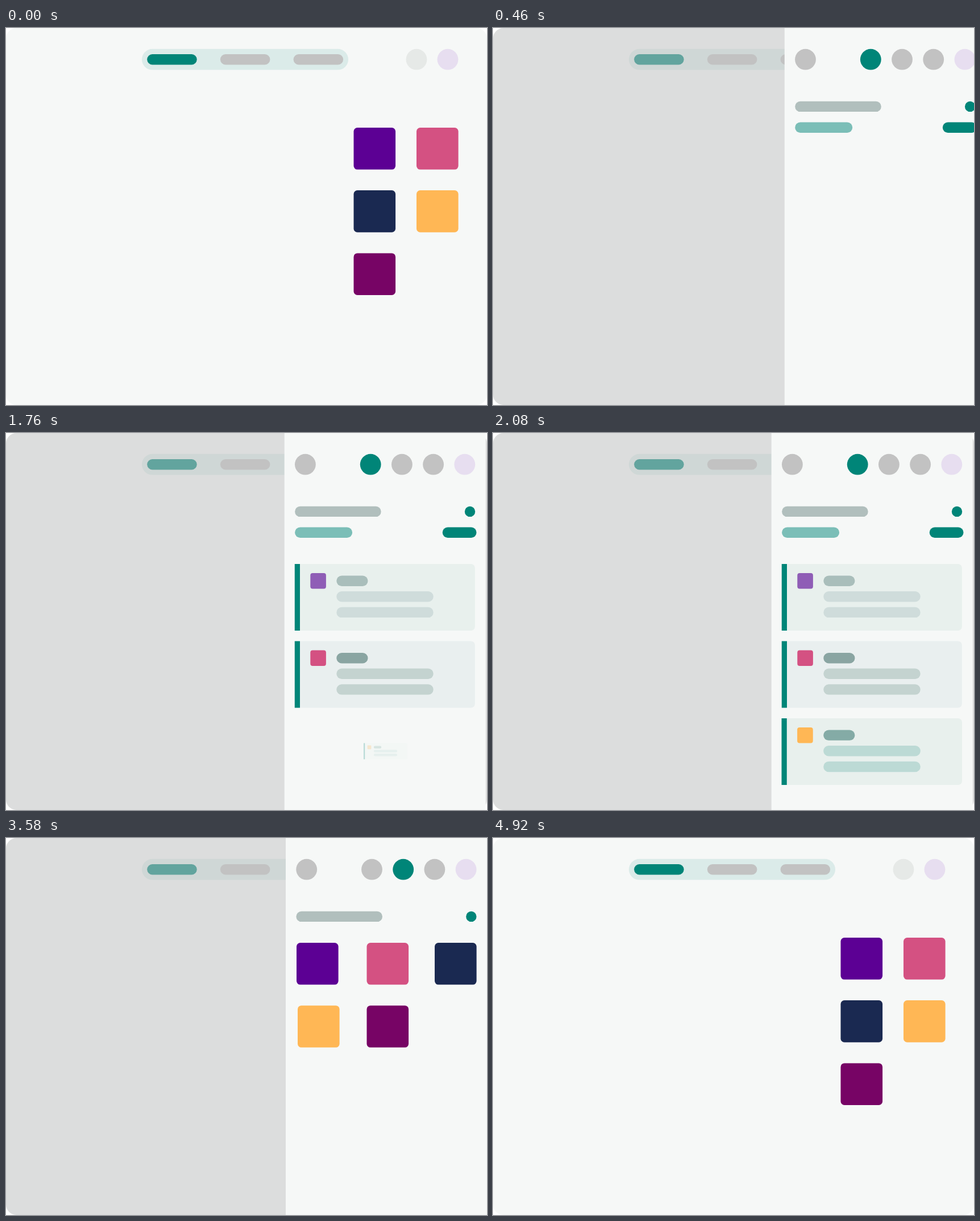
These frames come from a looping animation (846 by 662 pixels, 5.6 s). An HTML page with a canvas:

```html
<!DOCTYPE html>
<html lang="en">
<head>
<meta charset="utf-8">
<title>Side panel</title>
<style>
  html, body { margin: 0; width: 100%; height: 100%; overflow: hidden; background: #fff; }
  canvas { display: block; }
</style>
</head>
<body>
<canvas id="stage" width="846" height="662"></canvas>
<script>
const W = 846, H = 662, LOOP = 5600;
const ctx = document.getElementById('stage').getContext('2d');

const PAGE = '#f6f8f7', TEAL = '#008578', GRAY = '#c2c2c2', LILAC = '#e7def0';
const PURPLE = '#5c0094', PINK = '#d45182', NAVY = '#1a2951', ORANGE = '#ffb755', PLUM = '#770465';
const BAR = 18.4, TILE = 73.6;

const OPEN = { start: 34, time: 520 };
const CLOSE = { start: 4613, time: 300 };
const FADE = 300, SWITCH = 2520;
const TILES_START = 2500, TILE_TIME = 216, CARD_TIME = 350;

const CARDS = [
  { start: 702, y: 288.5, fill: '#e8f0ed', icon: '#8f5db6', title: '#a9bebb', line: '#cfdcdb' },
  { start: 1166, y: 424, fill: '#e9efef', icon: PINK, title: '#8aa5a2', line: '#c4d3d0' },
  { start: 1741.5, y: 559.5, fill: '#e8f0ed', icon: ORANGE, title: '#84aba6', line: '#bcdad5' }
];
const PAGE_TILES = [
  [611.5, 175, PURPLE], [722, 175, PINK], [611.5, 285.1, NAVY],
  [722, 285.1, ORANGE], [611.5, 395.4, PLUM]
];
const PANEL_TILES = [
  [19, 184, PURPLE], [142.5, 184, PINK], [262, 184, NAVY],
  [21, 294.2, ORANGE], [142.5, 294.2, PLUM]
];

const clamp = v => Math.min(1, Math.max(0, v));
const progress = (t, start, time) => clamp((t - start) / time);

// cubic-bezier(.42, 0, .58, 1)
function easeInOut(x) {
  let lo = 0, hi = 1;
  for (let i = 0; i < 24; i++) {
    const s = (lo + hi) / 2;
    if (1.26 * s - 0.78 * s * s + 0.52 * s * s * s < x) lo = s; else hi = s;
  }
  return lo * lo * (3 - 2 * lo);
}

function easeOutBack(x) {
  const k = 1.70158, u = x - 1;
  return 1 + (k + 1) * u * u * u + k * u * u;
}

function box(x, y, w, h, r, color) {
  ctx.fillStyle = color;
  ctx.beginPath();
  ctx.roundRect(x, y, w, h, r);
  ctx.fill();
}

function pill(x, y, w, color) {
  box(x, y, w, BAR, BAR / 2, color);
}

function dot(x, y, r, color) {
  ctx.fillStyle = color;
  ctx.beginPath();
  ctx.arc(x, y, r, 0, Math.PI * 2);
  ctx.fill();
}

function tile(x, y, color, scale = 1) {
  const size = TILE * scale, inset = (TILE - size) / 2;
  if (size > 0) box(x + inset, y + inset, size, size, 6.5 * scale, color);
}

function drawPage() {
  box(0, 0, W, H, BAR, PAGE);
  box(239, 36.8, 363, 36.8, BAR, '#dbebe9');
  [TEAL, GRAY, GRAY].forEach((c, i) => pill(248.2 + i * 128.7, 46, 87.5, c));
  dot(722, 55.2, BAR, '#e6e9e7');
  dot(777, 55.2, BAR, LILAC);
  PAGE_TILES.forEach(([x, y, c]) => tile(x, y, c));
}

function drawCard(card, t) {
  if (t <= card.start) return;
  const e = easeOutBack(progress(t, card.start, CARD_TIME));
  ctx.save();
  ctx.globalAlpha = clamp(e);
  ctx.translate(176.6 + 1.5 * (1 - e), card.y - (1 - e));
  ctx.scale(e, e);
  box(-158.5, -58.5, 317, 117, [0, 7, 7, 0], card.fill);
  box(-158.5, -58.5, 9.2, 117, 0, TEAL);
  box(-131, -42.5, 27.6, 27.6, 4, card.icon);
  pill(-85, -38, 55.2, card.title);
  pill(-85, -10.4, 170.4, card.line);
  pill(-85, 17.2, 170.4, card.line);
  ctx.restore();
}

function drawPanel(t, x) {
  const onTiles = t >= SWITCH;
  ctx.save();
  ctx.translate(x, 0);
  box(0, 0, 354, H, 0, PAGE);
  dot(36.7, 55.2, BAR, GRAY);
  for (let i = 0; i < 3; i++) {
    dot(151.5 + i * 55.2, 55.2, BAR, i === +onTiles ? TEAL : GRAY);
  }
  dot(317.1, 55.2, BAR, LILAC);
  pill(18.4, 128.7, 151.6, '#b1bfbd');
  dot(326.3, 137.9, 9.2, TEAL);
  if (onTiles) {
    PANEL_TILES.forEach(([tx, ty, c], i) => {
      tile(tx, ty, c, easeInOut(progress(t, TILES_START + i * TILE_TIME, TILE_TIME)));
    });
  } else {
    pill(18.4, 165.5, 101, '#7bbeb7');
    pill(278, 165.5, 59.8, TEAL);
    CARDS.forEach(card => drawCard(card, t));
  }
  ctx.restore();
}

function draw(t) {
  ctx.clearRect(0, 0, W, H);
  drawPage();

  const shade = 0.5 * (progress(t, OPEN.start, FADE) - progress(t, CLOSE.start, FADE));
  if (shade > 0) box(0, 0, W, H, BAR, `rgba(196, 196, 196, ${shade})`);

  const rest = t < SWITCH ? 489.7 : 492;
  const shown = easeInOut(progress(t, OPEN.start, OPEN.time)) -
                easeInOut(progress(t, CLOSE.start, CLOSE.time));
  if (shown > 0) drawPanel(t, W + (rest - W) * shown);
}

const begin = performance.now();
function tick() {
  draw((performance.now() - begin) % LOOP);
  requestAnimationFrame(tick);
}
tick();
</script>
</body>
</html>
```
